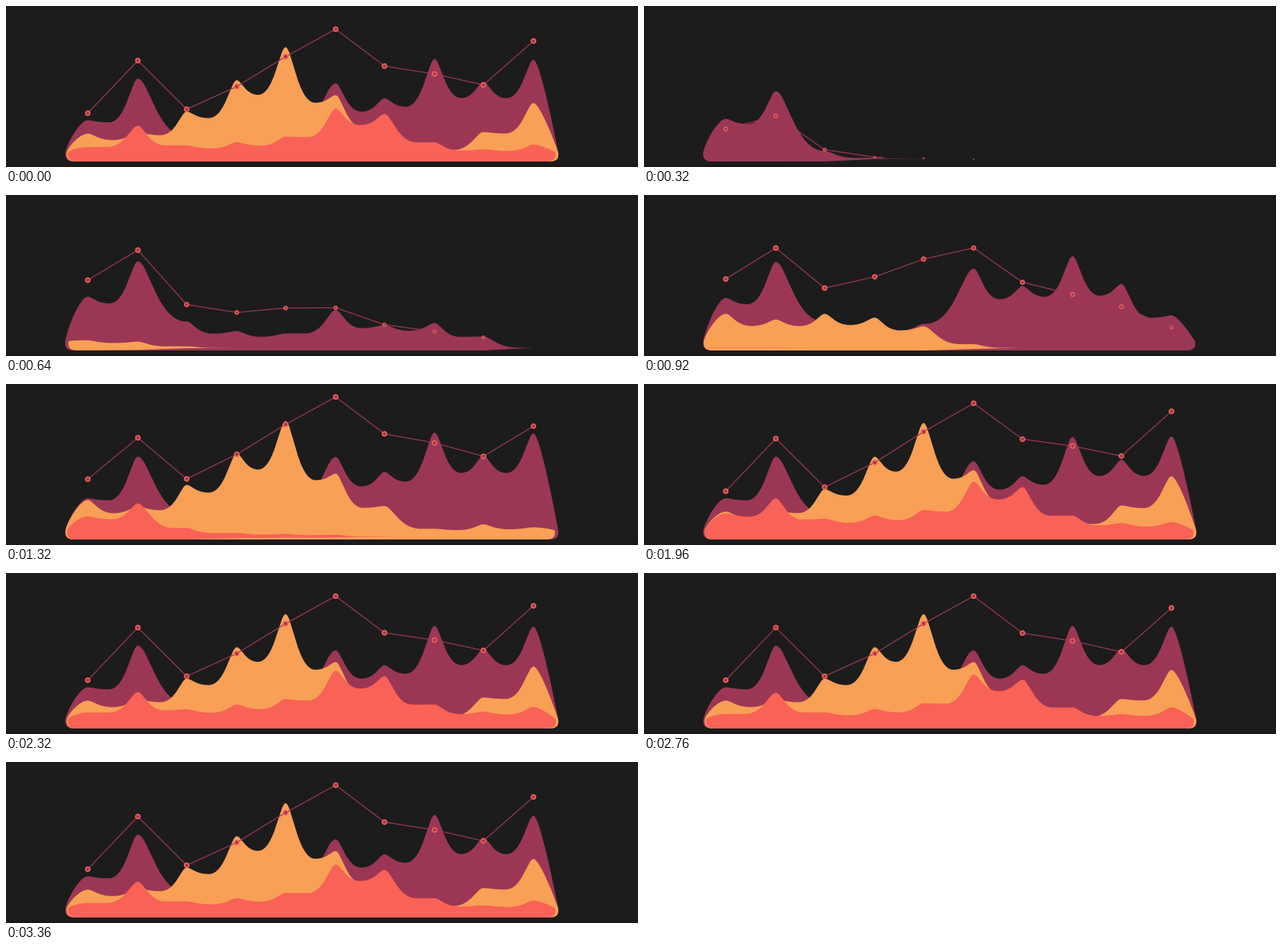
Write a matplotlib script that moves like this. It is 800 by 205 pixels and loops after 4360 ms.

```python
import numpy as np
import matplotlib.pyplot as plt
from matplotlib.animation import FuncAnimation
from matplotlib.patches import Circle, PathPatch, Rectangle
from matplotlib.path import Path

W, H, DPI = 800, 205, 80
STEP, LOOP = 40, 4360
BG, STRIP = "#1c1c1c", "#1a1819"
PURPLE, ORANGE, RED = "#9b3755", "#f8a055", "#f96256"
N = 10
INDEX = np.arange(N)
X = 103 + 62.6 * INDEX + 0.8 * (INDEX % 2)
BASE = 194
PX = 72 / DPI


def smooth(u):
    u = np.clip(u, 0, 1)
    return u * u * (3 - 2 * u)


def stagger(times):
    """Spread four key times over the points; the first two move together."""
    return np.interp(INDEX, (1, 3, 8, 9), times)


class Series:
    """Heights that rise past their goal, hold, then settle; times in ms."""

    def __init__(self, goal, over, start, peak, hold, settle):
        self.goal = np.array(goal)
        self.over = np.interp(INDEX, (0, 1, 2), over)
        self.start, self.peak = stagger(start), stagger(peak)
        self.hold, self.settle = hold, settle

    def rise(self, t):
        return smooth((t - self.start) / (self.peak - self.start))

    def heights(self, t):
        back = smooth((t - self.peak - self.hold) / self.settle)
        return self.rise(t) * (self.goal + self.over) - self.over * back


back_area = Series([49, 102, 28, 24, 25, 96, 77, 127, 98, 126], (16, 8, 5.5),
                   (20, 250, 500, 700), (450, 850, 1100, 1290), 380, 450)
mid_area = Series([32, 34, 60, 100, 142, 81, 44, 11, 34, 71], (15, 5, 6),
                  (490, 680, 1080, 1150), (1010, 1270, 1640, 1830), 250, 700)
front_area = Series([15, 42, 17, 21, 28, 64, 57, 21, 12, 18], (15, 7, 6),
                    (890, 1120, 1420, 1450), (1450, 1850, 2020, 2180), 480, 500)
trend = Series([59, 126, 64, 93, 131, 166, 119, 109, 95, 151], (30, 2, 13),
               (0, 230, 400, 720), (700, 1130, 1450, 1500), 150, 950)


def slope(a, b, a_grip, b_grip):
    """Bezier from a to b with level handles."""
    w = b[0] - a[0]
    return [(a[0] + a_grip * w, a[1]), (b[0] - b_grip * w, b[1]), b]


def valley(p, q):
    """Lowest place between two peaks; it nears the lower one if they differ."""
    if p[1] < q[1]:
        p, q = q, p
    diff = p[1] - q[1]
    dip = 0.27 * (BASE - p[1]) - 0.2 * diff
    part = np.clip(0.5 - 0.0015 * diff + 0.06 * min(dip, 0), 0, 0.5)
    return p[0] + part * (q[0] - p[0]), p[1] + max(dip, 0)


def area_path(h):
    top = BASE - h
    grow = np.clip(h / 10, 0, 1)
    low = BASE + 3.5 * grow
    left = 79.5 - 0.1 * min(h[0], 50)
    right = 693 + 0.1 * min(h[-1], 55)
    y0, y1 = BASE - 8 * grow[0], BASE - 8 * grow[-1]
    peaks = list(zip(X, top))

    pts = [(left, y0), (left + 2, y0 - 0.24 * h[0]), (X[0] - 10, top[0]),
           peaks[0]]
    for p, q in zip(peaks, peaks[1:]):
        v = valley(p, q)
        pts += slope(p, v, 0.22, 0.6) + slope(v, q, 0.6, 0.22)
    pts += [(X[-1] + 8, top[-1]), (right - 4, y1 - 0.17 * h[-1]), (right, y1),
            (right + 1, y1 + 8 * grow[-1]), (right - 2, low[-1]),
            (right - 12, low[-1])]
    n_curve = len(pts)
    pts += list(zip(X[::-1], low[::-1])) + [(left + 11, low[0])]
    n_line = len(pts) - n_curve
    pts += [(left + 3, low[0]), (left - 1, y0 + 8 * grow[0]), (left, y0)]
    codes = ([Path.MOVETO] + [Path.CURVE4] * (n_curve - 1)
             + [Path.LINETO] * n_line + [Path.CURVE4] * 3)
    return Path(pts, codes)


fig = plt.figure(figsize=(W / DPI, H / DPI), dpi=DPI, facecolor=BG)
ax = fig.add_axes([0, 0, 1, 1])
ax.set_xlim(-0.5, W - 0.5)
ax.set_ylim(H - 0.5, -0.5)
ax.axis("off")
ax.add_patch(Rectangle((-1, 201.5), W + 1, 4, fc=STRIP, lw=0))

areas = []
for z, (series, color) in enumerate([(back_area, PURPLE), (mid_area, ORANGE),
                                     (front_area, RED)], 1):
    patch = PathPatch(area_path(series.goal), fc=color, lw=0, zorder=z)
    areas.append((series, ax.add_patch(patch)))
line, = ax.plot([], [], color=PURPLE, lw=1.2 * PX, zorder=5)
dots = [ax.add_patch(Circle((x, BASE), 2.8, fc=PURPLE, ec=RED, zorder=6))
        for x in X]


def draw(i):
    t = i * STEP if i else LOOP
    for series, patch in areas:
        patch.set_path(area_path(series.heights(t)))

    y = BASE + 1 - trend.heights(t)
    head = min(X[-1], X[0] + 0.71 * (t - STEP))
    seen = X < head
    line.set_data(np.append(X[seen], head),
                  np.append(y[seen], np.interp(head, X, y)))
    for dot, x, yy, size in zip(dots, X, y, trend.rise(t) ** 0.22):
        dot.center = (x, yy)
        dot.set_radius(2.8 * size)
        dot.set_linewidth(1.5 * size * PX)
        dot.set_visible(size > 0)
    return [line, *dots, *(p for _, p in areas)]


anim = FuncAnimation(fig, draw, frames=LOOP // STEP, interval=STEP,
                     repeat=True, repeat_delay=0, blit=False)
plt.show()
```
